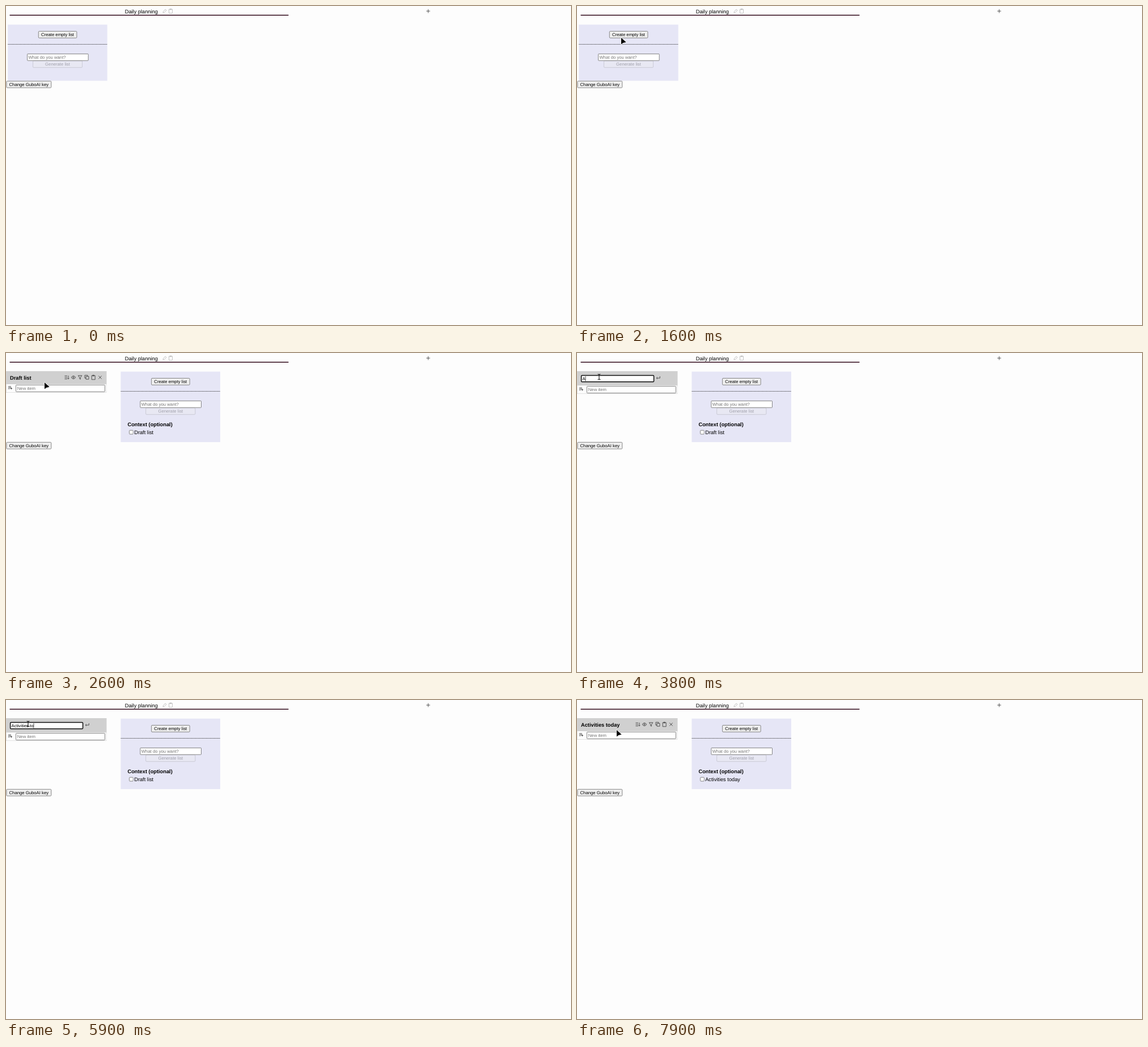
Recreate the animation shown at these times as an HTML page. Size 997 px wide and 562 px high, loop 8000 ms.

```html
<!DOCTYPE html>
<html lang="en">
<head>
<meta charset="utf-8">
<title>Daily planning</title>
<style>
  html, body { margin: 0; height: 100%; overflow: hidden; background: #fdfdfd; }
  svg { display: block; }
  text { font: 7.73px "Liberation Sans", Arial, sans-serif; text-rendering: geometricPrecision; white-space: pre; }
  .big { font-size: 9.27px; }
  .bold { font-weight: bold; }
  .mid { text-anchor: middle; }
  .hint { fill: #757575; }
  .off { opacity: .3; }
  .btn { fill: #efefef; stroke: #6b6b6b; stroke-width: .8; }
  .field { fill: #fff; stroke: #767676; stroke-width: .9; }
  .icon { fill: none; stroke: #444; stroke-width: .9; }
  .pale { stroke: #bbb; }
</style>
</head>
<body>
<svg width="997" height="562" viewBox="0 0 997 562">
  <defs>
    <path id="clip" d="M-3-3H3V4H-3ZM-1.3-3.8H1.3V-2.4H-1.3Z"/>
  </defs>

  <text class="big" x="209.7" y="13.4">Daily planning</text>
  <g class="icon pale">
    <path d="M277 12l.5-2.3 3.7-3.8 1.8 1.8-3.7 3.8Z"/>
    <use href="#clip" x="290.6" y="8.8"/>
  </g>
  <path d="M6.5 16.3H498.5" stroke="#30081a" stroke-width="1.5"/>
  <path class="icon" d="M741.7 9h6.6M745 5.7v6.6" stroke-width="1"/>

  <g id="maker">
    <rect id="panel" x="3.2" y="32.7" width="175.5" height="99" fill="#e6e6f6"/>
    <path d="M3.2 67.5H178.7" stroke="#333" stroke-width=".8" stroke-dasharray="1.16 .58"/>
    <rect id="create" class="btn" x="57.3" y="44.5" width="67.6" height="11.8" rx="1.4"/>
    <text class="mid" x="91" y="53.2">Create empty list</text>
    <rect class="field" x="37.6" y="84.4" width="107.6" height="11.8" rx=".8"/>
    <text class="hint" x="39.5" y="92.9">What do you want?</text>
    <g class="off">
      <rect class="btn" x="47.4" y="96.7" width="87.2" height="11.6" rx="1.4"/>
      <text class="mid" x="91" y="105.3">Generate list</text>
    </g>
    <g id="context">
      <text class="big bold" x="15.2" y="128.5">Context (optional)</text>
      <rect class="field" x="18.3" y="136.2" width="6.8" height="6.8" rx="1.2"/>
      <text id="label" class="big" x="26.9" y="143.2"></text>
    </g>
  </g>

  <g id="list">
    <rect id="frame" x=".6" y="32.4" width="176.4" height="37" fill="#fdfdfd" stroke="#d8d8d8" stroke-width=".7"/>
    <rect id="head" x=".3" y="32" width="177" height="23" fill="#d0d0d0"/>
    <g id="view">
      <text id="title" class="big bold" x="7" y="46.6"></text>
      <g id="tools" class="icon">
        <path d="M103.5 40.3h4.5M103.5 43h4.5M103.5 45.7h4.5M110 39.8v6M108.6 44.4l1.4 1.6 1.4-1.6"/>
        <path d="M115.2 43q3.8-5.4 7.6 0q-3.8 5.4-7.6 0Z"/><circle cx="119" cy="43" r="1.1"/>
        <path d="M127.3 39.8h6.6l-2.5 3.4v3l-1.6-.8v-2.2Z"/>
        <path d="M141 41.2h5v5h-5ZM141 44.2h-2v-5h5v2"/>
        <use href="#clip" x="154.2" y="42.8"/>
        <path d="M163.3 40.2l5.4 5.4M168.7 40.2l-5.4 5.4"/>
      </g>
    </g>
    <g id="edit">
      <rect x="7.6" y="39.6" width="128" height="11.2" rx="1.4" fill="#fff" stroke="#101010" stroke-width="1.5"/>
      <rect id="mark" x="9.5" y="40.8" width="28.4" height="8.8" fill="#1e90ff"/>
      <text id="typed" x="9.5" y="47.9"></text>
      <path id="caret" d="M0 41v8.6" stroke="#000" stroke-width=".7"/>
      <path class="icon" d="M146.3 41v3.2h-6M142 42.4l-1.8 1.8 1.8 1.8"/>
    </g>
    <g id="row">
      <path class="icon" d="M4 59h5M4 61h5M4 63h2.6M9.3 60.8v3.4M7.6 62.5h3.4"/>
      <rect class="field" x="17.5" y="56.4" width="157" height="11.8" rx=".8"/>
      <text class="hint" x="19.8" y="64.9">New item</text>
    </g>
  </g>

  <g id="key">
    <rect class="btn" x=".9" y="132.3" width="78.9" height="11.7" rx="1.4"/>
    <text class="mid" x="40.3" y="141">Change GuboAI key</text>
  </g>

  <g id="cursor">
    <path id="arrow" d="M0 0V11.6L3.3 9L8.7 7.7Z" stroke="#fff" stroke-width="1.2" paint-order="stroke"/>
    <path id="beam" d="M-2.4-4.8Q0-4.8 0-3.6Q0-4.8 2.4-4.8M0-3.8V3.8M-2.4 4.8Q0 4.8 0 3.6Q0 4.8 2.4 4.8" fill="none" stroke="#111" stroke-width="1.1"/>
  </g>
</svg>
<script>
const $ = id => document.getElementById(id);
const show = (id, on) => $(id).style.display = on ? "" : "none";
const move = (id, x, y) => $(id).setAttribute("transform", `translate(${x} ${y})`);
const set = (id, name, value) => $(id).setAttribute(name, value);

const OLD = "Draft list", NEW = "Activities today";
// When each letter of the new title is typed
const keys = [3800, 4000, 4200, 4300, 4600, 4600, 4900, 5000, 5100, 5300, 5400, 5500, 5800, 6400, 6500, 6600];
// Pointer path: time, x, y
const path = [
  [300, 3, 119], [600, 74, 58], [700, 80, 52], [1500, 80, 52], [1600, 78, 56], [2500, 78, 56],
  [2600, 68, 52], [3000, 39, 42], [7200, 39, 42], [7300, 30, 58], [7400, 18, 100],
  [7500, 50, 144], [7600, 100, 120], [7700, 108, 88], [7800, 86, 65], [7900, 70, 53]
];

function pointer(t) {
  const i = path.findIndex(p => p[0] >= t);
  if (i < 0) return path.at(-1).slice(1);
  if (i === 0) return path[0].slice(1);
  const [t0, x0, y0] = path[i - 1], [t1, x1, y1] = path[i];
  const k = (t - t0) / (t1 - t0);
  return [x0 + (x1 - x0) * k, y0 + (y1 - y0) * k];
}

function draw(t) {
  const made = t >= 1700, editing = t >= 3200 && t < 6900;
  const name = t < 6900 ? OLD : NEW;
  const [x, y] = pointer(t);

  move("maker", made ? 199.3 : 0, 0);
  set("panel", "height", made ? 124.3 : 99);
  move("key", 0, made ? 25 : 0);
  show("context", made);
  show("list", made);
  $("label").textContent = $("title").textContent = name;
  $("create").style.fill = t >= 600 && t < 1600 ? "#e5e5e5" : "";

  show("view", !editing);
  show("edit", editing);
  set("head", "height", editing ? 25.3 : 23);
  set("frame", "height", editing ? 39.3 : 37);
  move("row", 0, editing ? 2.3 : 0);
  $("tools").style.opacity = y < 55 ? 1 : .35;

  const count = keys.filter(k => k <= t).length;
  show("mark", !count);
  show("caret", count);
  $("typed").textContent = count ? NEW.slice(0, count) : OLD;
  set("typed", "fill", count ? "#000" : "#fff");
  if (editing) move("caret", 9.9 + $("typed").getComputedTextLength(), 0);

  const beam = t >= 2900 && t < 7300;
  show("cursor", t >= 300);
  show("arrow", !beam);
  show("beam", beam);
  move("cursor", x, y);
}

function tick() {
  draw(Math.floor(performance.now() % 8000 / 100) * 100);
  requestAnimationFrame(tick);
}
tick();
</script>
</body>
</html>
```
